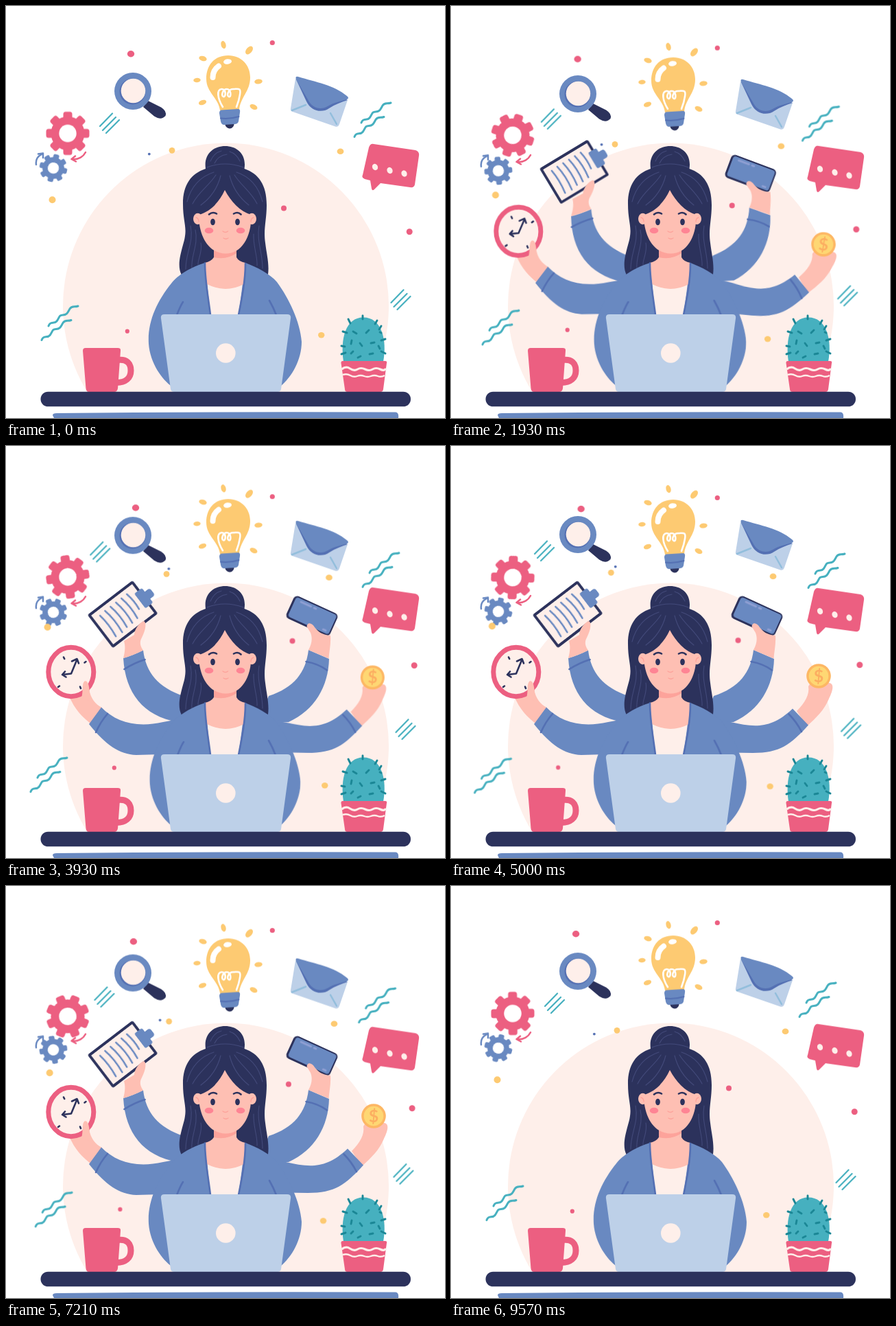
Recreate the animation shown at these times as an HTML page without scripts. Size 640x600 px, loop 9640 ms.

```html
<!DOCTYPE html>
<html lang="en">
<head>
<meta charset="utf-8">
<title>Multitasking</title>
<style>
  html, body { margin: 0; width: 100%; height: 100%; overflow: hidden; background: #fff; }
  svg { display: block; width: 100vw; height: 100vh; }

  .navy { fill: #2c325c; } .blue { fill: #6989c1; } .pale { fill: #bdd0e8; }
  .pink { fill: #ec5f81; } .gold { fill: #fdca72; } .teal { fill: #46b0bf; }
  .cream { fill: #feefea; } .skin { fill: #febfb3; }
  .line { fill: none; stroke-linecap: round; stroke-linejoin: round; }
  .fold { stroke: #5470b3; stroke-width: 2.6; }
  .ink { stroke: #2c325c; stroke-width: 2.6; }
  .sea { stroke: #46b0bf; stroke-width: 3; }
  .strand { stroke: #434a7a; stroke-width: 1.1; }

  .drift { animation: drift 4820ms cubic-bezier(.37, 0, .63, 1) infinite alternate; }
  @keyframes drift { to { transform: translate(var(--x), var(--y)); } }

  .slow { animation: slow 9640ms linear infinite; }
  @keyframes slow {
    11.8% { transform: translateY(1.7px); }
    28.9% { transform: translateY(4px); }
    40.8% { transform: translateY(5.2px); }
    53% { transform: translateY(6.2px); }
    63% { transform: translateY(6px); }
    84.4% { transform: translateY(3px); }
  }
  .quick { animation: quick 9640ms linear infinite; }
  @keyframes quick {
    11.8% { transform: translateY(2.1px); }
    28.9% { transform: translateY(6px); }
    35% { transform: translateY(6.6px); }
    40.8% { transform: translateY(6.2px); }
    63% { transform: translateY(3.8px); }
    84.4% { transform: translateY(1.6px); }
  }

  .spin { animation: spin 9640ms linear infinite; }
  @keyframes spin { to { transform: rotate(var(--turn)); } }

  .breathe { transform-origin: 320px 450px; animation: breathe 1205ms cubic-bezier(.37, 0, .63, 1) infinite alternate; }
  @keyframes breathe { to { transform: scaleX(.982); } }

  .arm, .held { animation: 9640ms ease-in-out infinite; }
  #clock-arm { transform-origin: 245px 425px; animation-name: clock-arm; }
  #board-arm { transform-origin: 254px 391px; animation-name: board-arm; }
  #phone-arm { transform-origin: 375px 390px; animation-name: phone-arm; }
  #coin-arm { transform-origin: 395px 425px; animation-name: coin-arm; }
  #board { transform-origin: 186px 285px; animation-name: board; }
  #phone { transform-origin: 450px 268px; animation-name: phone; }
  @keyframes clock-arm {
    0%, 3.2%, 83%, 100% { transform: rotate(-35deg) scale(0); }
    11.8% { transform: rotate(6deg) scale(1); }
    28.9% { transform: rotate(-5deg) scale(.97); }
    37%, 76.5% { transform: none; animation-timing-function: ease-in; }
    82.3% { transform: scale(0); }
  }
  @keyframes board-arm {
    0%, 5% { transform: rotate(-35deg) scale(0); }
    11.8% { transform: rotate(-9deg) scale(.87); }
    16.5% { transform: rotate(4deg) scale(1); }
    28.9% { transform: rotate(-5deg) scale(.965); }
    38%, 79.4% { transform: none; animation-timing-function: ease-in; }
    85.1%, 100% { transform: scale(0); }
  }
  @keyframes phone-arm {
    0%, 7% { transform: rotate(45deg) scale(0); }
    11.8% { transform: rotate(25deg) scale(.74); }
    18% { transform: rotate(-4deg) scale(1); }
    28.9% { transform: rotate(3deg) scale(.94); }
    39%, 82.6% { transform: none; animation-timing-function: ease-in; }
    88.3%, 100% { transform: scale(0); }
  }
  @keyframes coin-arm {
    0%, 9.5% { transform: rotate(40deg) scale(0); }
    11.8% { transform: rotate(33deg) scale(.29); }
    19% { transform: rotate(5deg) scale(1); }
    28.9% { transform: rotate(-5deg) scale(1); }
    40.8% { transform: rotate(.3deg) scale(.985); }
    44%, 85.8% { transform: none; animation-timing-function: ease-in; }
    91.5%, 100% { transform: scale(0); }
  }
  @keyframes board {
    11.8% { transform: rotate(9deg); }
    28.9% { transform: rotate(-2deg); }
    38% { transform: none; }
  }
  @keyframes phone {
    18% { transform: none; }
    28.9% { transform: rotate(-7deg); }
    39% { transform: none; }
  }
</style>
</head>
<body>
<svg viewBox="0 0 640 600">
  <defs>
    <g id="waves" class="line sea">
      <path id="wave" d="M518 170C521 162 526 168 530 163S533 154 539 154S546 150 549 145S556 143 561 141"/>
      <use href="#wave" x="-10" y="20.5"/>
    </g>
    <path id="hatch" class="line" stroke="#46b0bf" stroke-width="2.2" d="M137 175l18-18.500M141 181l19-19M146 185l19-19"/>
    <g id="gear">
      <circle r="24.500"/>
      <rect id="cog" x="-6.500" y="-31.500" width="13" height="63" rx="3.500"/>
      <use href="#cog" transform="rotate(45)"/>
      <use href="#cog" transform="rotate(90)"/>
      <use href="#cog" transform="rotate(135)"/>
      <circle r="12.700" fill="#fff"/>
    </g>
    <ellipse id="ray" rx="5.800" ry="3.500"/>
    <ellipse id="dot" rx="4" ry="4.800" transform="rotate(-25)"/>
  </defs>

  <path class="cream" d="M118.500 562A237.500 237.500 0 1 1 522.500 562Z"/>

  <!-- gears -->
  <g class="slow">
    <g transform="translate(90 185.500)" class="pink">
      <g class="spin" style="--turn:90deg"><use href="#gear"/></g>
    </g>
    <path class="line" stroke="#6989c1" stroke-width="2.500" d="M44 231C43 224 46 219 52 216M47 215.500L54 214.500L54 221"/>
  </g>
  <g class="quick">
    <g transform="translate(69 236) rotate(14) scale(.645)" class="blue">
      <g class="spin" style="--turn:-90deg"><use href="#gear"/></g>
    </g>
    <path class="line" stroke="#ec5f81" stroke-width="2.500" d="M116 213C113 219 106 224 97 223M101 218.500L95.500 223L102 226.500"/>
  </g>

  <!-- magnifier and envelope -->
  <g class="quick">
    <path class="navy" d="M200 147L207 138L226 147.500Q235 153 232.500 160Q226 167 216 160.500Z"/>
    <circle class="blue" cx="185" cy="124" r="27"/>
    <circle cx="184.500" cy="124.500" r="19" fill="#5470b3"/>
    <circle class="cream" cx="185.500" cy="123.500" r="17.800"/>
    <path class="pale" d="M422 106L415 149Q414 153 418 154L480 175.500Q484 177 486 172L498 137Z"/>
    <path class="line" stroke="#92bedc" stroke-width="2.500" d="M417 152L437 144M473 156L482 172"/>
    <path fill="#5470b3" d="M423 107L438 139C445 154 461 156 471 149C480 143 489 140 498 137Z"/>
    <path class="blue" d="M426 103Q421 102 423 107L440 136C446 149 459 152 469 146C479 140 487 139 497 136Q501 134 497 131C478 115 452 111 426 103Z"/>
  </g>

  <!-- bulb and speech bubble -->
  <g class="slow">
    <g class="gold">
      <path d="M324 72C343 72 356 86 356 104C356 125 341 133 340 152L312 152C310 134 292 126 292 106C292 86 304 72 324 72Z"/>
      <use href="#ray" transform="translate(317 56.500) rotate(75)"/>
      <use href="#ray" transform="translate(354.500 64.500) rotate(-50) scale(1.200)"/>
      <use href="#ray" transform="translate(287 76.500) rotate(15)"/>
      <use href="#ray" transform="translate(278.500 108) rotate(-5) scale(.900)"/>
      <use href="#ray" transform="translate(286.500 140.500) rotate(-20)"/>
      <use href="#ray" transform="translate(361 147) rotate(25)"/>
      <use href="#ray" transform="translate(368 110) rotate(-8)"/>
    </g>
    <path class="navy" d="M319 171L333 170Q332 178.500 326 178.500Q320 178 319 171Z"/>
    <path class="blue" d="M314 151.500L338 150Q342 150 341 155L339 168Q338 172 333 172L318 173Q314 173 313 168L311 156Q311 152 314 151.500Z"/>
    <path class="line" stroke="#5470b3" stroke-width="2" d="M313 163.500Q326 165 339.500 161"/>
    <g class="line" stroke="#fff">
      <path stroke-width="8" d="M301.500 104C301.500 97 305 91 310 87.500"/>
      <path stroke-width="2.600" d="M316 147C308 134 307 122 314 121S321 133 317 132S316 121 322 121S329 133 325 132S324 121 331 121S343 118 341 129C340 136 338 142 336 147"/>
    </g>
    <ellipse cx="323" cy="81" rx="6" ry="3.800" fill="#fff" transform="rotate(-8 323 81)"/>
    <path class="pink" d="M536 201L597 210Q603 212 602 218L596 260Q595 265 589 264L546 258L537 267Q534 270 533 266L531 254L523 252Q518 250 520 246L529 206Q531 200 536 201Z"/>
    <g class="cream">
      <use href="#dot" x="0" transform="translate(538 234.500)"/>
      <use href="#dot" transform="translate(559.500 239.500)"/>
      <use href="#dot" transform="translate(580.500 244)"/>
    </g>
  </g>

  <!-- floating marks -->
  <g class="drift" style="--x:13px;--y:16px"><use href="#waves"/></g>
  <g class="drift" style="--x:-17.500px;--y:18.500px"><use href="#waves" x="-456" y="296"/></g>
  <g class="drift" style="--x:-15px;--y:-18px"><use href="#hatch"/></g>
  <g class="drift" style="--x:7.600px;--y:-16.500px"><use href="#hatch" x="424.500" y="257"/></g>
  <g class="pink">
    <ellipse class="drift" style="--x:7.600px;--y:22px" cx="182" cy="69.800" rx="5.200" ry="4.700"/>
    <circle class="drift" style="--x:0px;--y:22px" cx="388.300" cy="53.500" r="3.600"/>
    <circle class="drift" style="--x:13.600px;--y:-11.500px" cx="405" cy="294.500" r="4"/>
    <circle class="drift" style="--x:7.600px;--y:-10px" cx="588.200" cy="328.700" r="4.500"/>
    <circle class="drift" style="--x:-20.700px;--y:-5.500px" cx="176.800" cy="473.700" r="3.100"/>
  </g>
  <g class="gold">
    <circle class="drift" style="--x:-8.700px;--y:-26px" cx="242" cy="210.300" r="4.400"/>
    <ellipse class="drift" style="--x:-18px;--y:-22px" cx="487.500" cy="211.700" rx="4.900" ry="4.300"/>
    <circle class="drift" style="--x:-7.600px;--y:-20px" cx="67.500" cy="282.200" r="5"/>
    <ellipse class="drift" style="--x:5.500px;--y:16.500px" cx="459.700" cy="479.300" rx="4.700" ry="4.200"/>
  </g>
  <circle class="drift" style="--x:31px;--y:-40px" cx="208.800" cy="215.600" r="1.900" fill="#5470b3"/>

  <!-- extra arms -->
  <g id="board-arm" class="arm">
    <path class="blue" d="M171 309Q185 305 200 297.500C204 330 222 352 259 364L290 400L250 402C200 393 174 360 171 309Z"/>
    <path class="line fold" d="M172.500 325C182 319 193 314 202.500 311"/>
    <g id="board" class="held">
      <g transform="translate(202 220) rotate(-37.400)">
        <rect class="cream" x="-80" y="-28" width="79" height="57" rx="1" stroke="#2c325c" stroke-width="3.800"/>
        <path class="line" stroke="#6989c1" stroke-width="2.500" d="M-68-18q3 18 0 38M-58-19q4 18 1 40M-48-19q4 18 1 38M-38-19q4 18 1 38M-28-19q4 18 1 37M-18-19q3 14 1 28"/>
        <path class="blue" d="M-7-13H2Q5-13 5-10V-6H10Q14-6 14-2V3Q14 7 10 7H5V11Q5 14 2 14H-7Q-9 14-9 11V-10Q-9-13-7-13Z"/>
      </g>
    </g>
    <path class="skin" d="M171 309C174 298 174 291 172 284L187 275C187 266 196 256 201 255C205 257 204 267 198 279C194 286 196 292 200 297.500Q185 305 171 309Z"/>
  </g>
  <g id="clock-arm" class="arm">
    <path class="skin" d="M92 364C100 384 112 395 123 404L140 381C130 376 124 368 121 355Z"/>
    <path class="blue" d="M262 396L229 402C190 411 160 402 139 380.500L121 405C145 435 165 449 190 450L262 448Z"/>
    <path class="line fold" d="M148 390C141 398 135 408 131 417"/>
    <ellipse class="cream" cx="94.800" cy="329" rx="33" ry="35.700" stroke="#ec5f81" stroke-width="7"/>
    <path class="line ink" d="M82.500 333L95 331.500L103.500 311M96 313.500L103.500 310L106 316.500M86 328.500L82 333L87.500 336.500"/>
    <path class="line ink" d="M84 307.500l1.200 2.500M116.500 314l-2 1.500M76 351l2-1.500M108 350.500l1 2.500"/>
    <path class="skin" d="M110 367C113 357 110 346 114.500 342.500C120 341 121 350 122 358L124 372Z"/>
  </g>
  <g id="phone-arm" class="arm">
    <path class="blue" d="M441 297L471 310C470 350 450 385 412 402L366 402L383 364C420 352 437 330 441 297Z"/>
    <path class="line fold" d="M437.500 314Q455 317 468 326.500"/>
    <g id="phone" class="held">
      <g transform="translate(446 247.500) rotate(24.500)">
        <rect class="navy" x="-35" y="-18" width="70" height="36" rx="6"/>
        <rect class="blue" x="-32" y="-16" width="65" height="31" rx="4"/>
        <path class="line" stroke="#8f9fd3" stroke-width="3" d="M-23-12h16M-2-12h3M23 11h4"/>
      </g>
    </g>
    <path class="skin" d="M441 297C446 288 447 280 444 272L438.500 263C439 256 446 257 450 264C455 270 460 275 473 276C474 288 471 300 470.500 309.500Z"/>
  </g>
  <g id="coin-arm" class="arm">
    <path class="skin" d="M504 386C516 374 523 362 521 350L526 342L551 345C560 346 556 358 551 368C544 385 533 395 519 408Z"/>
    <path class="blue" d="M372 396L408 402C440 409 465 414 498 382.500L521 406.500C495 435 480 447 440 447L372 446Z"/>
    <path class="line fold" d="M492.500 390.500Q504 402 511 416"/>
    <circle cx="536" cy="335" r="17.800" fill="#fdb764"/>
    <circle cx="536" cy="335" r="14.300" fill="#fed773"/>
    <text x="536" y="343.500" text-anchor="middle" font-family="Lato, sans-serif" font-size="25" font-weight="700" fill="#fcae61">$</text>
  </g>

  <!-- hair behind -->
  <path class="navy" d="M291 237C288 215 303 204 319.500 204S351 215 347.500 237C368 244 380 260 380 290C380 312 375 325 378 345C380 362 384 375 382 391L350 380H288L256 392C250 380 253 366 258 348C266 322 258 318 258 288C258 260 270 244 291 237Z"/>
  <g class="line strand">
    <path d="M293 235Q319 225 346 235M298 226Q303 214 314 211M304 229Q309 218 322 216M341 226Q336 215 326 212"/>
    <path d="M264 285C270 262 285 248 303 242M272 288C281 270 296 262 306 246M284 290C299 279 309 263 313 247M374 285C368 262 354 248 336 242M366 288C357 270 343 262 333 246M354 290C340 279 330 263 326 247"/>
    <path d="M269 320C274 345 262 358 262 383M276 326C281 347 269 365 271 382M284 345C287 358 279 370 280 377M369 320C365 342 374 358 374 382M361 332C360 350 367 365 366 378"/>
  </g>

  <!-- body -->
  <path class="blue breathe" d="M290 374C270 380 250 392 241 404C220 430 206 460 208 492C210 520 228 545 242 554H400C417 540 431 515 431 489C429 460 412 425 395 402C385 390 365 380 349 374Z"/>
  <path class="line fold breathe" d="M258 431C254 437 252 443 249 450M384 429C388 436 391 442 394 450"/>
  <path class="cream" d="M290 374L298 450H339L349 374Z"/>
  <path class="skin" d="M303 350V366Q299 372 290 374L293 405Q320 419 347 405L349 374Q339 372 336 366V350Z"/>
  <path fill="#fda39b" d="M303 352V366Q322 370 336 360V352Z"/>
  <path class="line fold" d="M290 374.500C290 400 295 425 298 450M349 375C349 400 344 425 339 450"/>

  <!-- head -->
  <g class="skin">
    <ellipse cx="279.500" cy="310" rx="6.500" ry="8.300"/>
    <ellipse cx="358.500" cy="310" rx="6.500" ry="8.300"/>
    <path d="M319 268C311 285 299 299 281 304C281 336 296 360.500 320 360.500S358 336 357.500 304C341 299 328 285 319 268Z"/>
  </g>
  <path class="line" stroke="#fda39b" stroke-width="1.300" d="M277 308q4 1 4 6M361 308q-4 1-4 6M316 328q4 3 7.500 0M317 338q3.500 2.500 7 0"/>
  <ellipse cx="296" cy="327" rx="6.300" ry="4.300" fill="#fe8494"/>
  <ellipse cx="342" cy="327" rx="6.300" ry="4.300" fill="#fe8494"/>
  <ellipse class="navy" cx="301.500" cy="314.500" rx="3.400" ry="4.800"/>
  <ellipse class="navy" cx="337.500" cy="314.500" rx="3.400" ry="4.800"/>
  <path class="line ink" d="M296 303.500Q301 299 307 302.500M332 302.500Q338 299 342.500 303.500"/>

  <!-- desk -->
  <path class="pale" d="M231 449H410Q416 449 415 455L401 558Q400 562 396 562H245Q241 562 240 558L226 455Q225 449 231 449Z"/>
  <circle class="cream" cx="320.300" cy="505.500" r="14.300"/>

  <path class="line" stroke="#ec5f81" stroke-width="9" d="M163 515.500C176 514 182 520 182 531S174 548.500 161 548.500"/>
  <path class="pink" d="M116 498H163Q167.500 498 167 502L163 557Q162 562 158 562H121Q117 562 116.500 557L112 502Q112 498 116 498Z"/>

  <path class="teal" d="M492 518C487 485 495 453.500 521 453.500S556 485 550 518Z"/>
  <path class="line" stroke="#1b8796" stroke-width="2.900" d="M499 456l3 6M520 451v5M541 458l-3 5M547 466l-3 5M491 474l6 2M547 476l-2-1M553 485l-6 2M489 495l5 1M489 507l6-2M553 506l-6-3M506 474l5 3M529 472l-4 4M516 491l3 4M537 490l-5 1M517 510l-4 2M535 506l-5 1M504 487l-1 5M543 495l2 4M506 503l-3 3"/>
  <path class="pink" d="M491 517H553Q556 517 555 520L550 558Q549.500 562 546 562H498Q494 562 494 558L488.500 520Q488 517 491 517Z"/>
  <g class="line" stroke="#feefea">
    <path stroke-width="3.200" stroke-linecap="butt" d="M489.500 529q6-5 12-1t11 1t11 0t11 0t11 0t8.500-1"/>
    <path stroke-width="2.400" stroke-linecap="butt" d="M491 537q6-2 11 1t10 1t10 0t10 0t10 0t10-1"/>
  </g>

  <rect class="navy" x="50.500" y="561.700" width="539.500" height="21.600" rx="10.800"/>
  <path class="blue" d="M68 596Q68 593 74 593Q300 590.500 568 591.500Q573 592 572 600H70Z"/>
</svg>
</body>
</html>
```
